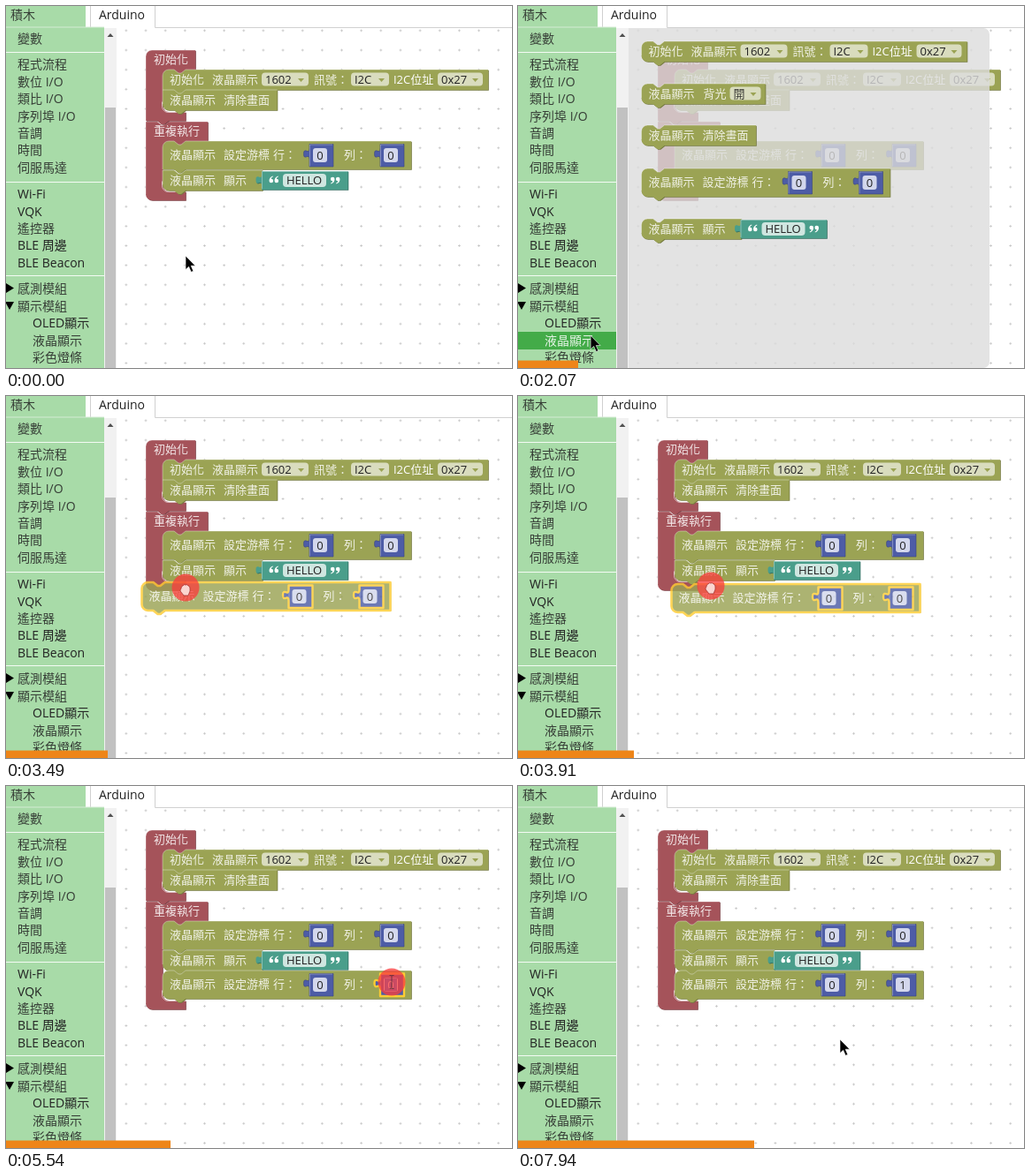
Animation, 572 px wide and 410 px high, one loop 8 s. Source, as an HTML page:

```html
<!DOCTYPE html>
<html lang="zh-TW">
<head>
<meta charset="utf-8">
<title>積木</title>
<style>
html, body { margin: 0; width: 100%; height: 100%; overflow: hidden; background: #fff; }
svg { display: block; width: 572px; height: 410px; }
text { font-family: "Open Sans", "Noto Sans CJK TC", "Noto Sans CJK", "Noto Sans", sans-serif; }
</style>
</head>
<body>
<svg id="stage" viewBox="0 0 572 410"></svg>
<script>
const OLIVE = '#9ba354', RED = '#a5535a', BLUE = '#4d5ca6', TEAL = '#4a9e8b', YELLOW = '#fc3';
const LOOP = 8000, STEP = 77.8;
const stage = document.getElementById('stage');

function add(parent, tag, attrs = {}) {
  const node = document.createElementNS('http://www.w3.org/2000/svg', tag);
  for (const key in attrs) node.setAttribute(key, attrs[key]);
  parent.appendChild(node);
  return node;
}
const group = (parent, x = 0, y = 0) => add(parent, 'g', { transform: `translate(${x} ${y})` });
const rect = (parent, x, y, width, height, fill, rx = 0) =>
  add(parent, 'rect', { x, y, width, height, fill, rx });
const path = (parent, d, fill, more = {}) => add(parent, 'path', { d, fill, ...more });
const show = (node, on) => node.setAttribute('display', on ? 'inline' : 'none');
const move = (node, x, y) => node.setAttribute('transform', `translate(${x} ${y})`);

function outline(parent, d, width) {
  const ring = path(parent, d, 'none',
    { stroke: YELLOW, 'stroke-width': width, 'stroke-linejoin': 'round' });
  show(ring, false);
  return ring;
}

// Chinese strokes are drawn a little softer than Latin ones.
function label(parent, x, middle, string, size = 13, fill = '#fff') {
  const node = add(parent, 'text', { x, y: middle + size * 0.36, 'font-size': size, fill });
  if (/^[\u4e00-\u9fff]/.test(string)) node.setAttribute('fill-opacity', 0.85);
  node.textContent = string;
  return node;
}

// ---- Block parts ----
const NOTCH = 'l5 4h3l5 -4', TAB = 'l-5 4h-3l-5 -4';

function solid(parent, top, rest, color) {
  path(parent, top + rest, color, { transform: 'translate(.8 .8)' }).style.filter = 'brightness(.75)';
  path(parent, top + rest, color);
  path(parent, top, 'none', { stroke: '#fff', 'stroke-opacity': 0.35 });
}

function topEdge(bottom, right, round, notch = true) {
  return `M0 ${bottom}` + (round ? 'V7a7 7 0 0 1 7 -7H13' : 'V0H13') + (notch ? NOTCH : '') + `H${right}`;
}

function bottomEdge(bottom, round, tab = true) {
  return `V${bottom}H26` + (tab ? TAB : '') + (round ? 'H7a7 7 0 0 1 -7 -7Z' : 'H0Z');
}

// A stackable block; "rings" are the yellow lines drawn while it is selected.
function statement(parent, x, y, w, h, roundTop, roundBottom) {
  const g = group(parent, x, y);
  const top = topEdge(roundBottom ? h - 7 : h, w, roundTop), rest = bottomEdge(h, roundBottom);
  solid(g, top, rest, OLIVE);
  return { g, x, y, w, h, rings: [outline(g, top + rest, 2.6)] };
}
const select = (block, on) => block.rings.forEach(ring => show(ring, on));

// A C-shaped block: the first has no notch above, the last no tab below.
function wrapper(parent, y, title, w, inner, first) {
  const g = group(parent, 158, y), head = 22, low = head + inner, end = low + 10;
  const top = topEdge(first ? end : end - 7, w, first, !first);
  const lip = `V${low - 7}a7 7 0 0 0 7 7H45`;
  const rest = `V${head}H45${TAB}H26a7 7 0 0 0 -7 7${lip}` + bottomEdge(end, !first, first);
  solid(g, top, rest, RED);
  path(g, `M18.5 ${low - 12}${lip}`, 'none',
    { stroke: '#fff', 'stroke-opacity': 0.6, transform: 'translate(0 .5)' });
  label(g, 9, 10, title);
  return g;
}

const PLUG = 'c0 -8.8 -6.5 2.2 -6.5 -6.6s6.5 2.2 6.5 -6.6';

function dropdown(parent, x, w, value) {
  rect(parent, x, 3.5, w, 15, '#fff', 4).setAttribute('fill-opacity', 0.62);
  label(parent, x + 4, 11, value, 13, '#222');
  path(parent, `M${x + w - 12} 10h7l-3.5 4z`, OLIVE);
}

function number(parent, x) {
  const g = group(parent, x, 3.5);
  const d = `M6 0H33V25.5H6V17.6${PLUG}Z`;
  path(g, d, BLUE, { stroke: '#39467f', 'stroke-width': 0.6 });
  path(g, 'M6.5 25V.5H32', 'none', { stroke: '#fff', 'stroke-opacity': 0.3 });
  const field = rect(g, 10, 4.5, 16, 16, '#d3d7ec', 3);
  const pick = rect(g, 11, 5, 14, 15, '#3377dd');
  show(pick, false);
  const text = label(g, 14.2, 12.5, '0', 13, '#222');
  return { ring: outline(g, d, 2.4), field, pick, text };
}

function initBlock(parent, x, y, alone) {
  const b = statement(parent, x, y, 368, 23, true, alone);
  label(b.g, 8, 11, '初始化');
  label(b.g, 56, 11, '液晶顯示');
  dropdown(b.g, 112, 53, '1602');
  label(b.g, 171, 11, '訊號：');
  dropdown(b.g, 213, 43, 'I2C');
  label(b.g, 261, 11, 'I2C位址');
  dropdown(b.g, 311, 51, '0x27');
  return b;
}

function lightBlock(parent, x, y) {
  const b = statement(parent, x, y, 140, 23, true, true);
  label(b.g, 8, 11, '液晶顯示');
  label(b.g, 70, 11, '背光');
  dropdown(b.g, 100, 35, '開');
  return b;
}

function clearBlock(parent, x, y, alone) {
  const b = statement(parent, x, y, 129.5, 23, alone, true);
  label(b.g, 8, 11, '液晶顯示');
  label(b.g, 69, 11, '清除畫面');
  return b;
}

function placeBlock(parent, x, y, roundTop, roundBottom) {
  const b = statement(parent, x, y, 281, 32, roundTop, roundBottom);
  label(b.g, 8, 15, '液晶顯示');
  label(b.g, 69, 15, '設定游標');
  label(b.g, 125, 15, '行：');
  label(b.g, 205, 15, '列：');
  b.row = number(b.g, 160);
  b.column = number(b.g, 240);
  b.rings.push(b.row.ring, b.column.ring);
  return b;
}

function printBlock(parent, x, y, alone) {
  const b = statement(parent, x, y, 113, 23, alone, true);
  label(b.g, 8, 11, '液晶顯示');
  label(b.g, 69, 11, '顯示');
  const plug = `M112 1H209.5V22H112V17.6${PLUG}Z`;
  path(b.g, plug, TEAL, { transform: 'translate(.8 .8)' }).style.filter = 'brightness(.7)';
  path(b.g, plug, TEAL);
  path(b.g, 'M112.5 21V1.5H209', 'none', { stroke: '#fff', 'stroke-opacity': 0.35 });
  rect(b.g, 136, 4, 49, 15, '#cfe6e0', 4);
  label(b.g, 140, 11, 'HELLO', 13, '#222');
  for (const [cx, turn] of [[126, 0], [195, 180]]) {
    const q = add(b.g, 'g', { transform: `translate(${cx} 11) rotate(${turn})` });
    for (const dx of [-5, 1])
      path(q, `M${dx + 3.5} -4.5q-4 1.5 -4 5.5a2.3 2.3 0 1 0 2.2 -2.3q.2 -1.7 2.3 -2.5z`, '#fff');
  }
  return b;
}

// ---- Workspace: the grid is aligned with the first block's corner ----
rect(stage, 0, 0, 572, 410, '#fff');
const GRID = 22.15;
const dots = add(add(stage, 'defs'), 'pattern', {
  id: 'dots', x: 158 - GRID / 2, y: 50 - GRID / 2, width: GRID, height: GRID, patternUnits: 'userSpaceOnUse'
});
path(dots, `M${GRID / 2 - 1.3} ${GRID / 2}h2.6m-1.3 -1.3v2.6`, 'none', { stroke: '#c4c4c4' });
rect(stage, 125, 25, 447, 385, 'url(#dots)');

const shortLoop = wrapper(stage, 131, '重複執行', 70, 57, false);
const longLoop = wrapper(stage, 131, '重複執行', 70, 90, false);
wrapper(stage, 50, '初始化', 56, 48, true);
initBlock(stage, 177, 72);
clearBlock(stage, 177, 95);
placeBlock(stage, 177, 153, true, false);
printBlock(stage, 177, 186);

const flyout = add(stage, 'g');
rect(flyout, 117, 25, 416, 385, '#ddd', 7).setAttribute('fill-opacity', 0.8);
const shelf = [
  initBlock(flyout, 139.5, 40, true),
  lightBlock(flyout, 139.5, 88),
  clearBlock(flyout, 139.5, 135, true),
  placeBlock(flyout, 139.5, 184, true, true),
  printBlock(flyout, 139.5, 241, true)
];
const carried = placeBlock(stage, 177, 209, true, true);

// ---- Header, menu and scrollbar ----
rect(stage, 0, 0, 572, 24, '#fff');
path(stage, 'M90 24.5H95.5V0M168.5 0V24.5H572', 'none', { stroke: '#d0d0d0' });
rect(stage, 0, 0, 90, 24, '#a8dba8');
rect(stage, 0, 24, 111, 386, '#a8dba8');
rect(stage, 0, 23.5, 111, 1, '#d5ecd5');
label(stage, 5, 10, '積木', 14, '#222');
label(stage, 105, 9.5, 'Arduino', 14, '#222');

rect(stage, 111, 25, 14, 385, '#f1f1f1');
const thumb = rect(stage, 112, 115, 12, 295, '#c1c1c1');
path(stage, 'M114.5 35l3.5 -4 3.5 4z', '#505050');

const rowMark = rect(stage, 0, 0, 111, 20, '#e4e4e4');
for (const y of [52, 199, 305]) rect(stage, 0, y, 111, 1, '#f4fbf4');
const menu = [
  [37, '變數'], [66, '程式流程'], [86, '數位 I/O'], [105, '類比 I/O'], [125, '序列埠 I/O'],
  [144, '音調'], [163, '時間'], [183, '伺服馬達'], [213, 'Wi-Fi'], [233, 'VQK'], [252, '遙控器'],
  [271, 'BLE 周邊'], [291, 'BLE Beacon'], [320, '感測模組'], [340, '顯示模組'],
  [359, 'OLED顯示'], [379, '液晶顯示'], [398, '彩色燈條']
].map(([y, name]) => ({ y, node: label(stage, y > 350 ? 30 : 13, y, name, 14, '#222') }));
const chosen = menu[16];
path(stage, 'M0 314l9 5.5 -9 5.5zM-1 335h10l-5 9z', '#000');

// ---- Pointer and progress ----
const pointer = add(stage, 'g');
const press = add(pointer, 'circle', { r: 15.5, fill: '#fa3c3c', 'fill-opacity': 0.76 });
const hand = path(pointer, 'M-5 1q0 -3 2 -3q1 -2 3 -1q2 -1 3 1q2 0 2 3v3l-2 5h-5l-4 -5q0 -2 1 -3z',
  '#fbd5d0', { stroke: '#a33', 'stroke-width': 0.8 });
const arrow = path(pointer, 'M0 0V15.5L3.6 12.2 6.3 18.3 8.8 17.2 6.2 11.2H11Z', '#000',
  { stroke: '#fff', 'stroke-width': 0.6 });
const beam = path(pointer, 'M-2.5 -7.5h2l.5 .5 .5 -.5h2M0 -7V7M-2.5 7.5h2l.5 -.5 .5 .5h2', 'none',
  { stroke: '#222', 'stroke-opacity': 0.7, 'stroke-width': 0.8 });
const bar = rect(stage, 0, 401.5, 0, 8.5, '#ee8518');

// ---- Timeline: [ms, value], eased between entries ----
const track = {
  x: [[0, 203], [650, 203], [1500, 80], [2000, 80], [2850, 185], [3190, 185], [3490, 203],
      [3910, 218], [4150, 221], [4330, 221], [5150, 436], [6950, 436], [7330, 391], [7700, 391], [7940, 364]],
  y: [[0, 283], [650, 283], [1500, 377], [2000, 377], [2850, 187], [3190, 187], [3490, 217],
      [3910, 215], [4150, 214], [4330, 214], [4700, 188], [5150, 222], [6950, 222], [7330, 272],
      [7700, 272], [7940, 287]],
  blockX: [[3190, 139.5], [3490, 153.5], [3910, 173.5], [4150, 176]],
  blockY: [[3190, 184], [3490, 211], [3910, 213], [4150, 211]]
};
const OPEN = 1780, DRAG = 3230, DROP = 4150, EDIT = 5400, TYPE = 6450, LEAVE = 7400;
const presses = [[1620, 1900], [3170, DROP], [EDIT, 5850], [LEAVE, 7600]];

function at(keys, t) {
  const i = keys.findIndex(key => key[0] > t);
  if (i < 0) return keys[keys.length - 1][1];
  if (i === 0) return keys[0][1];
  const [t0, a] = keys[i - 1], [t1, b] = keys[i], k = (t - t0) / (t1 - t0);
  return a + (b - a) * k * k * (3 - 2 * k);
}

function draw(t) {
  const x = at(track.x, t), y = at(track.y, t);
  const open = t >= OPEN && t < DRAG, dragging = t >= DRAG && t < DROP, editing = t >= EDIT && t < LEAVE;

  bar.setAttribute('width', Math.round(Math.floor((t + 2) / STEP) * STEP * 0.0336));
  thumb.setAttribute('fill', x > 111 && x < 125 && y > 115 ? '#a8a8a8' : '#c1c1c1');

  const hovered = x < 111 ? menu.find(row => Math.abs(row.y - y) < 10) : null;
  const marked = open ? chosen : hovered;
  show(rowMark, marked);
  if (marked) rowMark.setAttribute('y', marked.y - 10);
  rowMark.setAttribute('fill', open ? '#43ab48' : '#e4e4e4');
  chosen.node.setAttribute('fill', open ? '#fff' : '#222');

  show(flyout, open);
  for (const b of shelf)
    select(b, x > b.x && x < b.x + b.w && y > b.y && y < b.y + b.h);

  show(shortLoop, t < DROP);
  show(longLoop, t >= DROP);
  show(carried.g, t >= DRAG);
  move(carried.g, dragging ? at(track.blockX, t) : 177, dragging ? at(track.blockY, t) : 209);
  carried.g.setAttribute('opacity', dragging ? 0.82 : 1);
  select(carried, t < EDIT);

  const { ring, field, pick, text } = carried.column;
  const typed = t >= TYPE;
  show(ring, t < LEAVE);
  field.setAttribute('fill', editing ? '#fff' : '#d3d7ec');
  show(pick, editing && !typed);
  text.setAttribute('fill', editing && !typed ? '#fff' : '#222');
  text.textContent = typed ? '1' : '0';

  const inField = t > DROP && x > 427 && x < 445 && y > 213 && y < 235;
  move(pointer, x, y);
  show(press, presses.some(([from, to]) => t >= from && t < to));
  show(hand, dragging);
  show(beam, inField);
  show(arrow, !dragging && !inField);
}

const start = performance.now();
function tick(now) {
  draw(Math.max(0, now - start) % LOOP);
  requestAnimationFrame(tick);
}
draw(0);
requestAnimationFrame(tick);
</script>
</body>
</html>
```
